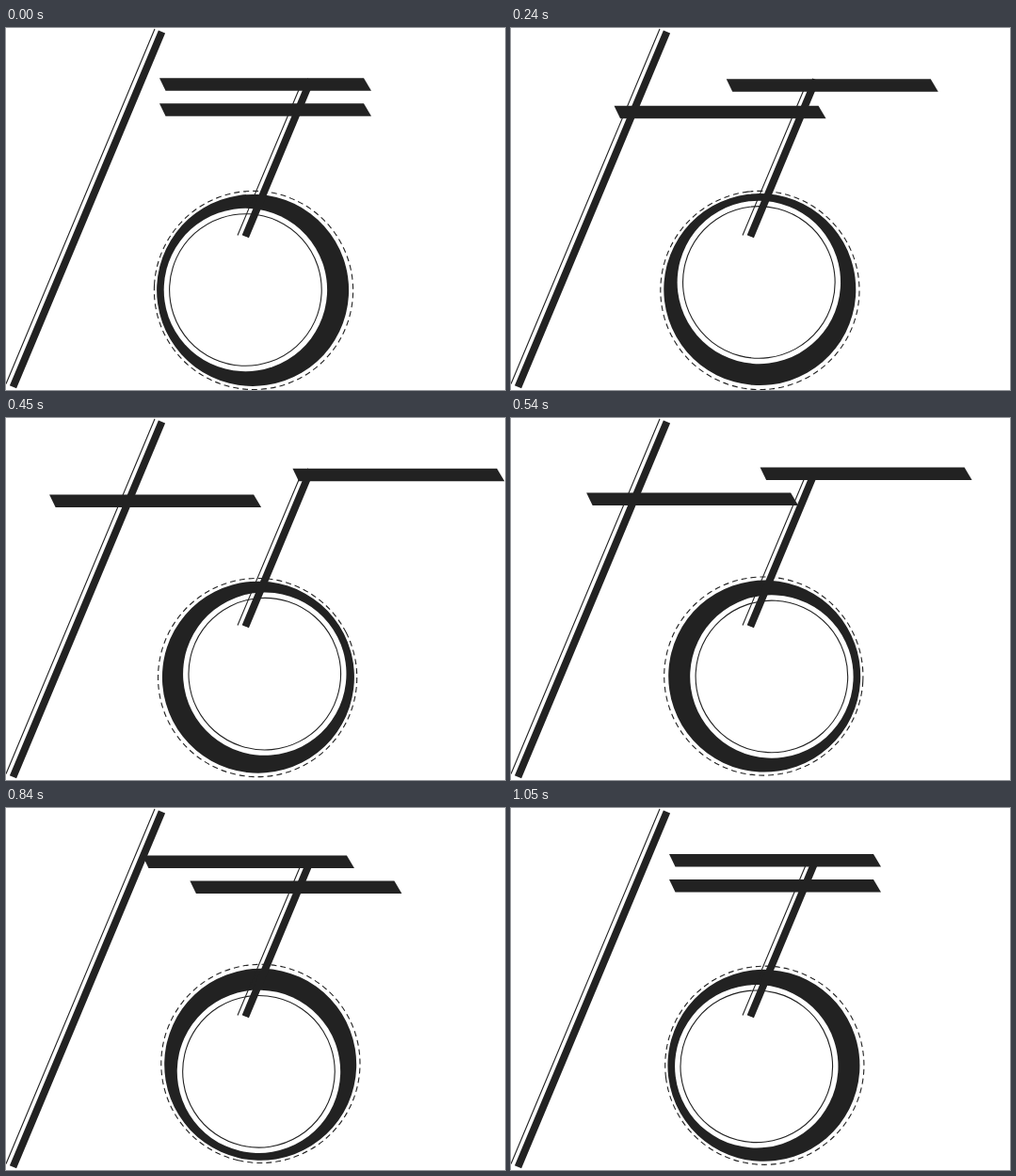
Animation of 530x385 px, one loop 1080 ms. Source, as an HTML page:

```html
<!DOCTYPE html>
<html lang="en">
<head>
<meta charset="utf-8">
<title>Slash and ring</title>
<style>
  html, body { margin: 0; width: 100%; height: 100%; overflow: hidden; background: #fff; }
  svg { display: block; width: 530px; height: 385px; }
  .thin { fill: none; stroke: #222; stroke-width: 1.1; }
  .thick { fill: none; stroke: #222; stroke-width: 7.8; }
  .solid { fill: #222; }
</style>
</head>
<body>
<svg viewBox="0 0 530 385">
  <g id="ring">
    <circle class="thin" r="105.6" pathLength="666" stroke-dasharray="6 4"/>
    <circle class="solid" cx="0.9" r="102"/>
    <circle cx="8.6" r="86.7" fill="#fff"/>
    <circle class="thin" cx="8.6" r="80.8"/>
  </g>
  <path class="thin" d="M158 1L0 378.5M315.5 55L246 220.5"/>
  <path class="thick" d="M165.5 4L7.5 381.8M323.8 55L254.3 221.7"/>
  <path id="upper" class="solid" d="M0 0H217L225 13.5H6.5Z"/>
  <path id="lower" class="solid" d="M0 0H217L225 13.5H6.5Z"/>
</svg>
<script>
  const LOOP = 1080, STEP = 30;

  const smooth = u => u * u * (3 - 2 * u);
  const launch = u => u ** 1.35;
  const settle = u => (u + smooth(u)) / 2;

  // Keys: time, value, easing towards that value
  const swing = [[0, 0], [435, 1, launch], [790, -0.21, settle], [1050, 0]];
  const driftX = [[0, 163], [150, 162], [330, 170], [540, 167.5], [840, 171.5], [1050, 168]];
  const driftY = [[0, 53.2], [330, 54.4], [720, 51.2], [1050, 48.9]];

  function at(keys, t) {
    const i = keys.findIndex(key => key[0] > t);
    if (i < 0) return keys[keys.length - 1][1];
    const [t0, from] = keys[i - 1], [t1, to, ease = smooth] = keys[i];
    return from + (to - from) * ease((t - t0) / (t1 - t0));
  }

  function place(id, x, y, turn = 0) {
    document.getElementById(id)
      .setAttribute('transform', `translate(${x} ${y}) rotate(${turn})`);
  }

  function draw(now) {
    const t = Math.floor((now % LOOP) / STEP) * STEP;
    const s = at(swing, t), x = at(driftX, t), y = at(driftY, t);
    const gap = 27 + 1.5 * Math.max(0, Math.sin(2 * Math.PI * t / LOOP));
    place('upper', x + 140 * s, y);
    place('lower', x - 126 * s, y + gap);

    const ringX = 263 + 7.4 * Math.sin(Math.PI * t / 1680) ** 2;
    const ringY = 275.7 + 3.8 * Math.cos(2 * Math.PI * (t - 120) / 1400);
    place('ring', ringX, ringY, 183 + 360 * t / LOOP);
  }

  const start = performance.now();
  function tick() {
    draw(performance.now() - start);
    requestAnimationFrame(tick);
  }
  tick();
</script>
</body>
</html>
```
